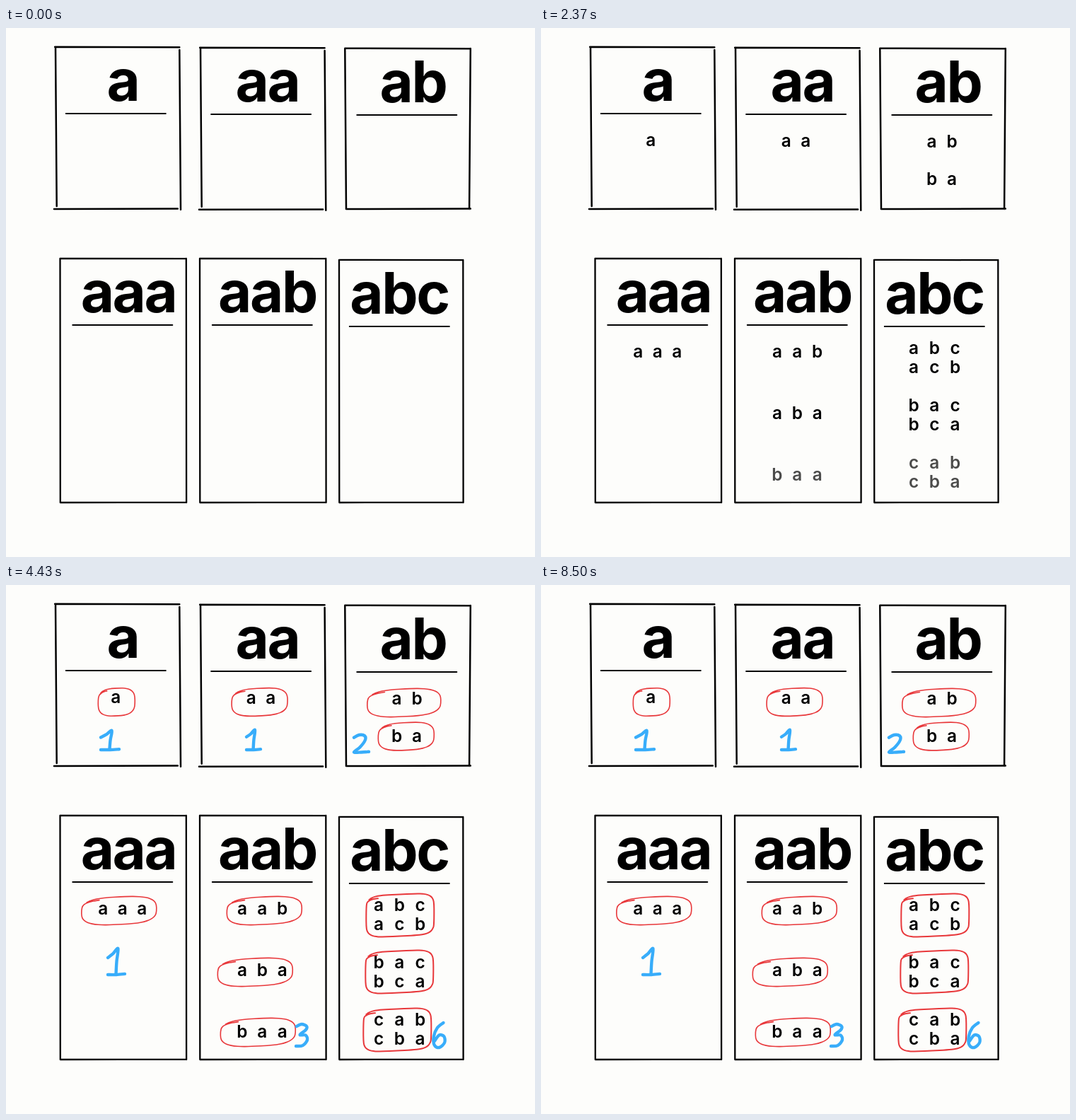
Animation, 748 px wide and 748 px high, one loop 8.53 s. Source, as an HTML page:

```html
<!DOCTYPE html>
<html lang="en">
<head>
<meta charset="utf-8">
<style>
  html, body { margin: 0; width: 100%; height: 100%; overflow: hidden; background: #fdfdfb; }
  svg { display: block; width: 100%; height: 100%; }
  path { fill: none; stroke: #000; stroke-linecap: round; stroke-linejoin: round; }
  text { font-family: Inter, "Noto Sans", sans-serif; text-anchor: middle; }
  .title { font-size: 81.5px; font-weight: 700; letter-spacing: -2.4px; }
  .word { font-size: 24.4px; font-weight: 600; }
  .ring { stroke: #e8383b; }
  .digit { stroke: #38adfa; stroke-width: 4.4; }
</style>
</head>
<body>
<svg viewBox="0 0 748 748"></svg>
<script>
const LOOP = 8530, FADE = 400, STARTS = [450, 1320, 2090, 3330];

// mid: centre of the rule and words; rings: offset of each ring from its words (and extra width);
// count: box of the handwritten number
const cards = [
  { text: 'a', left: 70, top: 27, mid: 155.3, titleMid: 165, rings: [[1, 6]], count: [134, 206, 26, 27] },
  { text: 'aa', left: 275, top: 28, mid: 360.6, titleMid: 369.5, rings: [[-2, 5]], count: [340, 205, 20, 28] },
  { text: 'ab', left: 479.3, top: 29, mid: 566.8, titleMid: 575.5, rings: [[-4, 5, 25], [-1, 0]], count: [492, 212, 21, 25] },
  { text: 'aaa', left: 76.5, top: 326, mid: 164.8, titleMid: 173, rings: [[-5, 2]], count: [144, 514, 24, 37] },
  { text: 'aab', left: 274, top: 326, mid: 362.3, titleMid: 369.5, rings: [[3, 2], [-10, 2], [-6, 0]], count: [410, 621, 16, 31] },
  { text: 'abc', left: 471, top: 328, mid: 556.3, titleMid: 556, rings: [[1, 0], [0, -1], [-3, 0]], count: [604, 619, 17, 35] }
];

// Pen strokes in a unit square
const glyphs = {
  1: ['0,.35 .3,.2 .6,0 .52,.5 .48,.97', '0,1 .5,1 1,.97'],
  2: ['0,.15 .35,0 .72,.05 .75,.3 .4,.7 0,.97 .5,.98 1,.95'],
  3: ['.05,.1 .5,0 .95,.1 .85,.27 .35,.48 .85,.5 1,.72 .6,.97 0,1'],
  6: ['.85,0 .35,.2 .05,.55 .1,.9 .5,1 .95,.8 .9,.55 .5,.5 .1,.75']
};

const svg = document.querySelector('svg');

function add(parent, tag, attrs = {}, text = '') {
  const el = document.createElementNS('http://www.w3.org/2000/svg', tag);
  for (const k in attrs) el.setAttribute(k, attrs[k]);
  el.textContent = text;
  parent.append(el);
  return el;
}

const steps = STARTS.map(() => add(svg, 'g'));
const notes = steps[3];

// Smooth path through points
function curve(p) {
  const at = i => p[Math.max(0, Math.min(p.length - 1, i))];
  return p.slice(1).reduce((d, c, i) => {
    const b = p[i];
    const c1 = b.map((v, k) => v + (c[k] - at(i - 1)[k]) / 6);
    const c2 = c.map((v, k) => v - (at(i + 2)[k] - b[k]) / 6);
    return d + `C${c1} ${c2} ${c}`;
  }, 'M' + p[0]);
}

// Distinct arrangements of the letters, in alphabetical order
function arrange(s) {
  if (s.length < 2) return [s];
  return [...new Set([...s].flatMap((ch, i) =>
    arrange(s.slice(0, i) + s.slice(i + 1)).map(rest => ch + rest)))];
}

function drawBox({ left: l, top: t, mid }, i) {
  const r = mid + 90, upper = i < 3, loose = i < 2;
  const b = upper ? 256 + i % 2 * .8 : 671;
  const lean = upper ? 1.7 : .3;
  const [gap, shift] = loose ? [4, 2.5] : [0, 0];
  const turn = i === 2 ? -1 : 1;
  add(svg, 'path', {
    d: `M${l - shift / 3} ${t - .2}L${r} ${t + .2}M${l} ${t}L${l + lean} ${b - gap}
      M${r} ${t + gap}L${r + lean * turn} ${b + shift / 3}M${l + (loose ? -2 : lean)} ${b}L${r - shift} ${b - .4}`,
    'stroke-width': upper ? 2.5 : 2.3
  });
}

function drawWord(parent, word, x, y, pitch) {
  [...word].forEach((ch, i) => add(parent, 'text',
    { class: 'word', x: x + (i - (word.length - 1) / 2) * pitch, y }, ch));
}

// Leaning rounded loop whose end curls inside its start
function drawRing(cx, cy, w, h, power, width) {
  const points = [], N = 30;
  for (let i = 0; i <= N; i++) {
    const a = -2.5 + i / N * 6.75;
    const round = v => Math.sign(v) * Math.abs(v) ** (2 / power);
    const size = .5 - .05 * Math.max(0, i - N + 3) / 3;
    const x = w * size * round(Math.cos(a));
    points.push([cx + x, cy + h * size * round(Math.sin(a)) - x * .05]);
  }
  add(notes, 'path', { class: 'ring', d: curve(points), 'stroke-width': width });
}

function drawDigit(n, [x, y, w, h]) {
  for (const stroke of glyphs[n]) {
    const points = stroke.split(' ').map(s => {
      const [u, v] = s.split(',').map(Number);
      return [x + u * w, y + v * h];
    });
    add(notes, 'path', { class: 'digit', d: curve(points) });
  }
}

cards.forEach((card, i) => {
  const { text, top, mid, titleMid, rings, count } = card;
  const rule = top + 94, n = text.length;
  drawBox(card, i);
  add(svg, 'text', { class: 'title', x: titleMid, y: rule - 18 }, text);
  add(svg, 'path', { d: `M${mid - 70.5} ${rule}L${mid + 70.5} ${rule - .1}`, 'stroke-width': 2 });

  const words = arrange(text), paired = words.length > 3;
  const gap = paired ? 81 : n > 2 ? 87 : 52.5;
  const pitch = 26.6 + .9 * new Set(text).size;
  words.forEach((word, k) => {
    const block = paired ? k >> 1 : k;
    const y = rule + 46 + block * gap + (paired ? k % 2 * 27 - 7 : 0);
    drawWord(steps[block], word, mid, y, pitch);
  });

  rings.forEach(([dx, dy, extra = 0], k) => drawRing(
    mid + dx, rule + (paired ? 45 : 38.5) + k * gap + dy,
    25 + 27 * n + extra - (paired ? 10 : 0), paired ? 59 : 39,
    paired ? 5 : 3, paired ? 2 : 1.6));
  drawDigit(words.length, count);
});

function draw(now) {
  const t = now % LOOP;
  steps.forEach((g, i) =>
    g.setAttribute('opacity', Math.max(0, Math.min(1, (t - STARTS[i]) / FADE))));
  requestAnimationFrame(draw);
}
draw(0);
</script>
</body>
</html>
```
